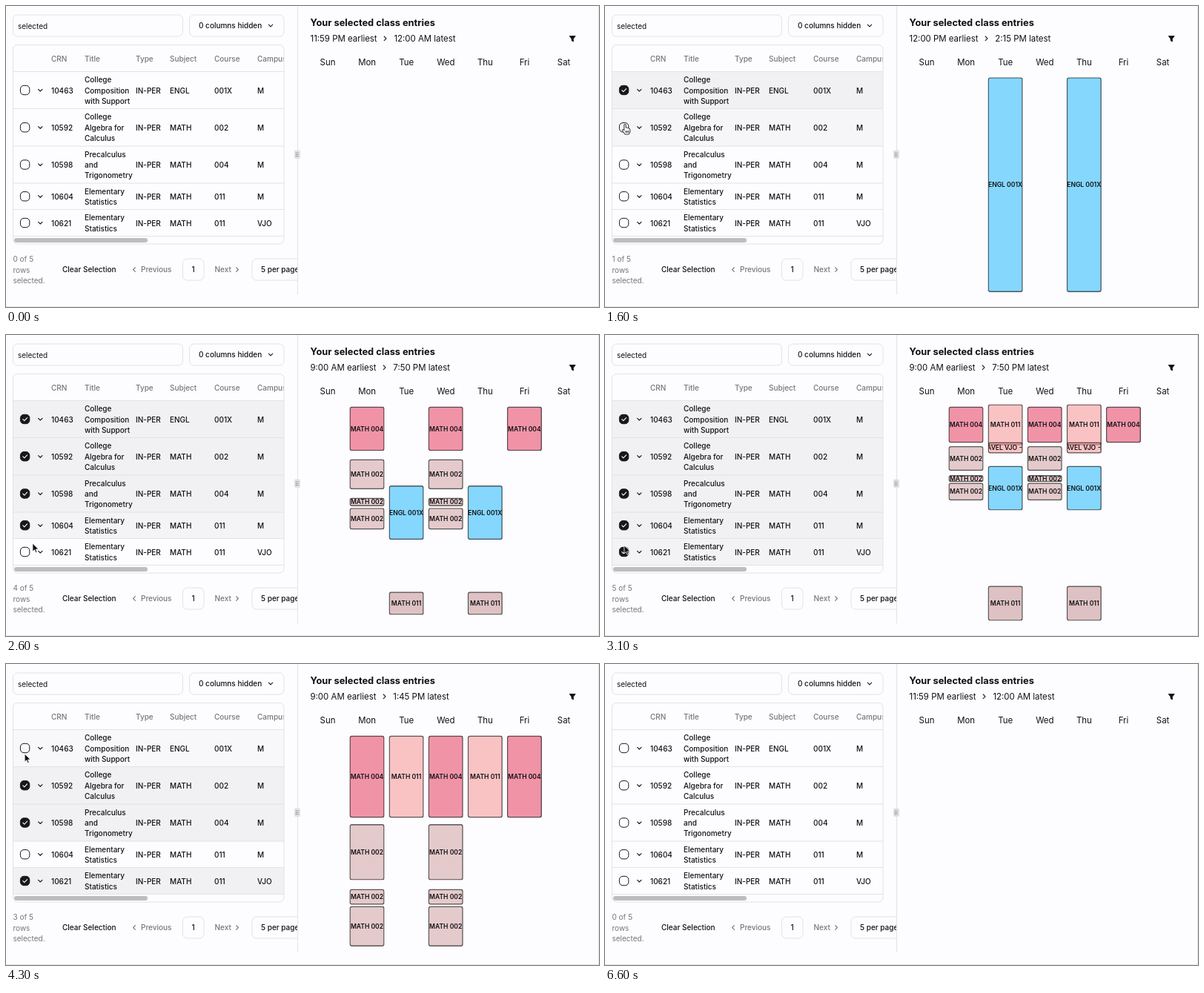
An HTML page that plays this animation: 800x406 px, repeating every 6700 ms.

```html
<!DOCTYPE html>
<html lang="en">
<head>
<meta charset="utf-8">
<title>Class picker</title>
<style>
html, body { margin: 0; width: 100%; height: 100%; overflow: hidden; background: #fdfcfe; }
svg { display: block; }
text, #times { font-family: Inter, Roboto, sans-serif; fill: #101013; color: #101013; }
.cell { font-size: 10px; font-weight: 500; }
.soft { fill: #75757c; }
.heading { font-size: 12.8px; font-weight: 700; }
.day { font-size: 11.43px; text-anchor: middle; }
.label { font-size: 8.57px; font-weight: 600; text-anchor: middle; }
.line { fill: none; stroke: #e3e2e6; }
.icon { fill: none; stroke: #18181b; stroke-width: 1.1; stroke-linecap: round; stroke-linejoin: round; }
#times { position: absolute; left: 410.5px; top: 35px; height: 18px; display: flex; align-items: center; gap: 5.7px; font-size: 11.43px; white-space: nowrap; }
</style>
</head>
<body>
<svg id="stage" width="800" height="406" viewBox="0 0 800 406">
  <defs>
    <clipPath id="leftClip"><rect width="393" height="406"/></clipPath>
    <clipPath id="tableClip"><rect x="10" y="53" width="365" height="268" rx="6"/></clipPath>
    <clipPath id="calendarClip"><rect x="394" width="406" height="389"/></clipPath>
  </defs>
  <g id="left" clip-path="url(#leftClip)">
    <g clip-path="url(#tableClip)"><g id="rows"></g><g id="table"></g></g>
    <g id="controls"></g>
    <g id="count"></g>
  </g>
  <g id="right"></g>
  <g id="blocks" clip-path="url(#calendarClip)"></g>
  <g id="cursor"></g>
</svg>
<div id="times"><span id="from"></span><svg width="11.4" height="11.4"><path class="icon" d="M4.2 3l2.8 2.8-2.8 2.8"/></svg><span id="to"></span></div>
<script>
const LOOP = 6700, TOP = 96.6, SPAN = 288.9, OPEN = 540, ENTER_DELAY = 12;
const $ = id => document.getElementById(id);

// Block times are minutes after 9:00 AM: [start, length]
const courses = [
  { crn: 10463, title: ['College', 'Composition', 'with Support'], subject: 'ENGL', course: '001X', campus: 'M',
    y: 88.5, h: 50, color: '15,180,255', days: [2, 4], times: [[180, 135]] },
  { crn: 10592, title: ['College', 'Algebra for', 'Calculus'], subject: 'MATH', course: '002', campus: 'M',
    y: 138.5, h: 50.5, color: '203,154,154', days: [1, 3], times: [[120, 75], [208, 21], [231, 54]] },
  { crn: 10598, title: ['Precalculus', 'and', 'Trigonometry'], subject: 'MATH', course: '004', campus: 'M',
    y: 189, h: 50, color: '230,45,82', days: [1, 3, 5], times: [[0, 110]] },
  { crn: 10604, title: ['Elementary', 'Statistics'], subject: 'MATH', course: '011', campus: 'M',
    y: 239, h: 35.5, color: '192,138,138', days: [2, 4], times: [[544, 106]] },
  { crn: 10621, title: ['Elementary', 'Statistics'], subject: 'MATH', course: '011', campus: 'VJO',
    y: 274.5, h: 36, color: '246,140,140', days: [2, 4], times: [[0, 110]] }
];
const paintOrder = [2, 1, 0, 3, 4];

// [time, row toggled]
const clicks = [[1130, 0], [1640, 1], [2061, 2], [2516, 3], [2950, 4],
  [3423, 3], [4200, 0], [4680, 1], [4860, 2], [5350, 4]];

// Pointer rests: [arrive, leave, x, y, row, sideways bulge on the way in]
const rests = [[690, 690, -8, 175, -1], [1000, 1180, 26, 113, 0], [1450, 1690, 27, 159, 1],
  [1950, 2130, 27, 218, 2], [2380, 2520, 27, 262, 3], [2670, 3000, 27, 296, 4, 9],
  [3250, 3440, 24, 262, 3], [3900, 4240, 25, 113, 0], [4480, 4700, 26, 163, 1],
  [4840, 4960, 26, 222, 2], [5200, 5400, 26, 292, 4], [5760, 5760, -12, 330, -1]];

const text = (x, y, s, cls = 'cell', extra = '') => `<text x="${x}" y="${y}" class="${cls}" ${extra}>${s}</text>`;
const box = (x, y, w, h, r = 6, attrs = 'class="line"') =>
  `<rect x="${x}" y="${y}" width="${w}" height="${h}" rx="${r}" ${attrs}/>`;
const path = (d, attrs = 'class="icon"') => `<path d="${d}" ${attrs}/>`;
const down = (x, y) => path(`M${x - 2.7} ${y - 1.3}l2.7 2.7 2.7-2.7`);
const side = (x, y, dir) => path(`M${x - 1.4 * dir} ${y - 2.8}l${2.8 * dir} 2.8 ${-2.8 * dir} 2.8`, 'class="icon" style="stroke:#75757c"');

function drawStatic() {
  const heads = [[61, 'CRN'], [106, 'Title'], [175, 'Type'], [221, 'Subject'], [281, 'Course'], [339, 'Campus']];
  let out = heads.map(([x, s]) => text(x, 75.2, s, 'cell soft')).join('');
  for (const c of courses) {
    const mid = c.y + c.h / 2 + .4, base = mid + 3.6;
    out += path(`M10 ${c.y}H375`, 'class="line"') + down(46.3, mid - .3);
    c.title.forEach((s, i) => out += text(106, base + (i - (c.title.length - 1) / 2) * 14.3, s));
    [[61, c.crn], [175, 'IN-PER'], [221, c.subject], [281, c.course], [339, c.campus]]
      .forEach(([x, s]) => out += text(x, base, s));
  }
  out += path('M10 310.5H375', 'class="line"') + box(11, 313, 180, 6, 3, 'fill="#bdbcbf"');
  $('table').innerHTML = out;

  $('controls').innerHTML =
    box(9.5, 12, 229, 29) + text(16, 30.6, 'selected', 'cell', 'style="font-weight:400"') +
    box(247.5, 12, 127.5, 29) + text(260, 30.3, '0 columns hidden') + down(357, 26.5) +
    box(9.5, 52.5, 365.5, 268.5) +
    text(76, 359.4, 'Clear Selection') +
    side(173, 355.5, -1) + text(182, 359.4, 'Previous', 'cell soft') +
    box(238.5, 341, 28.5, 29) + text(252.7, 359.4, '1', 'cell', 'text-anchor="middle"') +
    text(281.5, 359.4, 'Next', 'cell soft') + side(312, 355.5, 1) +
    box(332, 341, 90, 29) + text(344, 359.4, '5 per page');

  const dots = [198, 200.3, 202.6].map(y => [391.6, 393.8].map(x => `<circle cx="${x}" cy="${y}" r=".6" fill="#55555a"/>`).join('')).join('');
  $('right').innerHTML =
    path('M393.5 0V389M799.5 0V405.5H0', 'class="line"') +
    box(389, 194.5, 8, 11.5, 2, 'fill="#e1e0e4"') + dots +
    text(410.5, 26.8, 'Your selected class entries', 'heading') +
    path('M760.2 40.5H768.2L765.4 44.3V48L763 46.6V44.3Z', 'fill="#101013" stroke="#101013" stroke-linejoin="round" stroke-width=".8"') +
    ['Sun', 'Mon', 'Tue', 'Wed', 'Thu', 'Fri', 'Sat'].map((d, i) => text(434 + i * 53.1, 80, d, 'day')).join('');
}

function spring(ms, damping) {
  const x = Math.max(0, ms) * .022, w = Math.sqrt(1 - damping * damping);
  return 1 - Math.exp(-damping * x) * (Math.cos(w * x) + damping / w * Math.sin(w * x));
}

function rangeOf(on) {
  const times = courses.flatMap((c, i) => on[i] ? c.times : []);
  return times.length ? [Math.min(...times.map(b => b[0])), Math.max(...times.map(b => b[0] + b[1]))] : null;
}

// Selection at a time: when each row was switched on, and the last change of range
function stateAt(t) {
  const on = [0, 0, 0, 0, 0];
  let range = null, last = null, since = 0;
  for (const [at, row] of clicks) {
    if (at > t) break;
    on[row] = on[row] ? 0 : at;
    const next = rangeOf(on);
    if (String(next) !== String(range)) { last = range || next; range = next; since = at; }
  }
  return { on, range, last, since };
}

const place = (start, length, [a, b]) => [TOP + (start - a) * SPAN / (b - a), length * SPAN / (b - a)];

// Blocks spring to the new scale; new ones also grow from their middle
function drawBlocks(t, { on, range, last, since }) {
  let out = '';
  const add = (i, start, length, label) => {
    const [toY, toH] = place(start, length, range);
    const [fromY, fromH] = on[i] === since ? [toY, toH] : place(start, length, last);
    const fullH = fromH + (toH - fromH) * spring(t - since, .5);
    const h = Math.max(2, fullH * spring(t - on[i] - ENTER_DELAY, .5));
    const y = fromY + (toY - fromY) * spring(t - since, .68) + (fullH - h) / 2;
    for (const day of courses[i].days) {
      out += `<svg x="${463.4 + (day - 1) * 53.1}" y="${y}" width="47.2" height="${h}">` +
        box(.7, .7, 45.8, Math.max(.1, h - 1.4), 2.5, `fill="rgba(${courses[i].color},.5)" stroke="#000" stroke-opacity=".62" stroke-width="1.4"`) +
        `<svg x="1" width="45.2" height="${h}">${text(22.6, h / 2 + 3.1, label, 'label')}</svg></svg>`;
    }
  };
  for (const i of paintOrder) {
    if (!on[i]) continue;
    const c = courses[i];
    c.times.forEach(([start, length]) => add(i, start, length, `${c.subject} ${c.course}`));
    if (i === 4 && (on[0] || on[3])) add(4, 110, 30, 'TRAVEL VJO -&gt; M');
  }
  $('blocks').innerHTML = out;
}

function hoverOf(row, t) {
  return Math.max(0, ...rests.map(([a, b, , , r]) => r === row && t >= a ? Math.min(1, 1 - (t - b) / 200) : 0));
}

function drawRows(t, on) {
  $('rows').innerHTML = courses.map((c, i) => {
    const hover = hoverOf(i, t), mid = c.y + c.h / 2;
    const base = on[i] ? [241, 240, 242] : [253, 252, 254];
    const fill = base.map((v, k) => Math.round(v + ([246, 245, 248][k] - v) * hover));
    return box(10, c.y, 365, c.h, 0, `fill="rgb(${fill})"`) +
      box(19.4, mid - 6.2, 12.4, 12.4, 4.6, `fill="${on[i] ? '#18181b' : 'none'}" stroke="#18181b"`) +
      (on[i] ? path(`M22.8 ${mid + .2}l2 2 3.8-4`, 'class="icon" style="stroke:#fff"') : '');
  }).join('');
}

function drawCursor(t) {
  const next = rests.findIndex(r => r[0] > t);
  let out = '';
  if (next > 0) {
    const [, leave, x0, y0] = rests[next - 1], [arrive, , x1, y1, , bulge = 0] = rests[next];
    const p = Math.max(0, (t - leave) / (arrive - leave)), e = p * p * (3 - 2 * p);
    const x = x0 + (x1 - x0) * e + bulge * Math.sin(Math.PI * p), y = y0 + (y1 - y0) * e;
    const shape = p === 0
      ? path('M-1.2 1.2Q0-.6 1.2 1.2V5.2Q2.4 4.4 3.3 5.6Q4.6 5 5.2 6.3Q6.8 6 6.8 7.8V10Q6.6 12 5.2 14H-.3Q-1.6 11.6-3.4 9.6Q-4.4 7.8-3 7.4L-1.2 8.8Z M1 9.2V12M2.8 9.2V12M4.6 9.2V12',
          'fill="#fff" stroke="#111" stroke-width=".9" stroke-linejoin="round"')
      : path('M0 0V11L2.6 8.7L4.2 12.4L6 11.6L4.4 8H7.9Z', 'fill="#111" stroke="#fff" stroke-width=".8"');
    out = `<g transform="translate(${x} ${y})">${shape}</g>`;
  }
  $('cursor').innerHTML = out;
}

function clock(minutes) {
  const m = minutes + OPEN, h = Math.floor(m / 60);
  return `${h % 12 || 12}:${String(m % 60).padStart(2, '0')} ${h < 12 ? 'AM' : 'PM'}`;
}

function frame() {
  const t = performance.now() % LOOP, state = stateAt(t);
  const [a, b] = state.range || [899, -540];
  $('from').textContent = clock(a) + ' earliest';
  $('to').textContent = clock(b) + ' latest';
  $('count').innerHTML = [`${state.on.filter(Boolean).length} of 5`, 'rows', 'selected.']
    .map((s, i) => text(9.5, 345.2 + i * 14.3, s, 'cell soft', 'style="font-weight:400"')).join('');
  drawRows(t, state.on);
  drawBlocks(t, state);
  drawCursor(t);
  requestAnimationFrame(frame);
}

drawStatic();
frame();
</script>
</body>
</html>
```
